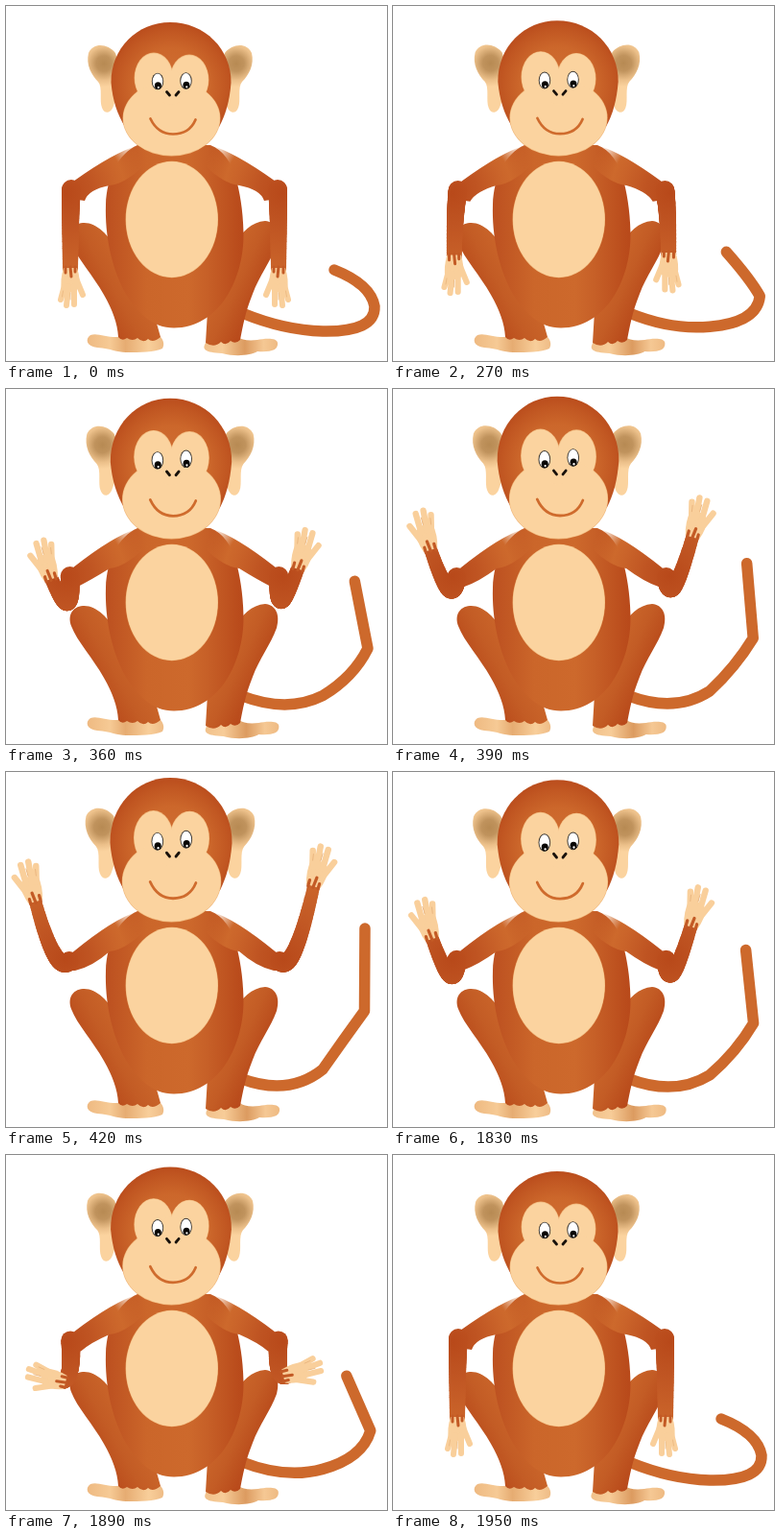
An HTML page with a canvas for the animation above (2400 ms loop, 397x370 px).

```html
<!DOCTYPE html>
<html lang="en">
<head>
<meta charset="utf-8">
<title>Waving monkey</title>
<style>
html, body { margin: 0; width: 100%; height: 100%; overflow: hidden; background: #fff; }
canvas { display: block; }
</style>
</head>
<body>
<canvas id="stage" width="397" height="370"></canvas>
<script>
const ctx = document.getElementById('stage').getContext('2d');
const LOOP = 2400, STEP = 30, RAISE_AT = 270, LOWER_AT = 1830;
const FUR = '#cd692c', DARK = '#b8491a', SKIN = '#fbd39f', PALM = '#f9cf9b';

const mix = (a, b, k) => a + (b - a) * k;
const clamp = v => Math.min(1, Math.max(0, v));
const smooth = (from, to, v) => {
  const k = clamp((v - from) / (to - from));
  return k * k * (3 - 2 * k);
};
const quad = (a, b, c, k) => mix(mix(a, b, k), mix(b, c, k), k);

function gradient(g, ...stops) {
  stops.forEach(([at, color]) => g.addColorStop(at, color));
  return g;
}
const radial = (x, y, r, ...stops) => gradient(ctx.createRadialGradient(x, y, 0, x, y, r), ...stops);
const linear = (x0, y0, x1, y1, ...stops) => gradient(ctx.createLinearGradient(x0, y0, x1, y1), ...stops);

function fill(path, style) {
  ctx.fillStyle = style;
  ctx.fill(new Path2D(path));
}

function stroke(path, style, width) {
  ctx.strokeStyle = style;
  ctx.lineWidth = width;
  ctx.stroke(new Path2D(path));
}

function oval(x, y, rx, ry, style) {
  ctx.beginPath();
  ctx.ellipse(x, y, rx, ry, 0, 0, 7);
  ctx.fillStyle = style;
  ctx.fill();
}

function mirrored(axis, draw) {
  ctx.save();
  ctx.translate(2 * axis, 0);
  ctx.scale(-1, 1);
  draw();
  ctx.restore();
}

function scaledAbout(x, y, sx, sy, draw) {
  ctx.save();
  ctx.translate(x, y);
  ctx.scale(sx, sy);
  ctx.translate(-x, -y);
  draw();
  ctx.restore();
}

// 0 = arms hanging, 1 = arms raised
function raisedAt(t) {
  const steps = from => Math.floor((t - from) / STEP) + 1;
  if (t < RAISE_AT) return 0;
  return t < LOWER_AT ? clamp(steps(RAISE_AT) / 6) : clamp(1 - steps(LOWER_AT) / 5);
}

function tail(p) {
  const kneeX = mix(384, 373.5, p), kneeY = mix(313, 249, p);
  const tipX = mix(342, 374, p), tipY = mix(275, 163, p);
  const straight = clamp(3 * p);
  const bendX = mix(380, (kneeX + tipX) / 2, straight);
  const bendY = mix(290, (kneeY + tipY) / 2, straight);
  stroke(`M246 320Q${mix(290, 295, p)} 338 330 ${mix(339, 310, p)}` +
    `Q${mix(385, 351, p)} ${mix(340, 280, p)} ${kneeX} ${kneeY}` +
    `Q${bendX} ${bendY} ${tipX} ${tipY}`, FUR, 11.5);
}

function legs(p) {
  fill('M118 345C105 346 95 340 88 343C82 347 84 355 95 356C110 357 115 361 125 361C140 361 155 361 163 357C166 352 163 346 160 344Z',
    linear(84, 0, 165, 0, [0, '#eeb981'], [.3, '#f6ca95'], [.5, '#e6ac72'], [.8, '#f8ce9a'], [1, '#eebb85']));
  fill('M118 256C106 238 94 225 80 226C69 227 64 236 68 247C74 263 91 281 102 301C111 317 116 330 117 345Q121 350 126 346Q132 350 137 346Q143 352 148 347Q153 352 161 345L154 320Z',
    linear(75, 285, 130, 255, [0, DARK], [.45, '#c35c25'], [1, FUR]));
  ctx.save();
  ctx.translate(2 * p, 0);
  fill('M208 351C204 358 207 361 225 362C240 366 255 364 262 360C275 361 284 359 283 351C282 345 268 347 262 348C252 349 245 348 242 345Z',
    linear(206, 0, 284, 0, [0, '#f1c18b'], [.25, '#f7cc98'], [.55, '#dc9b60'], [.8, '#f5c894'], [1, '#eeb981']));
  ctx.restore();
  fill('M235 252C246 235 256 225 270 224C281 225 286 235 282 249C276 266 264 281 257 300C249 320 247 333 244 348Q239 353 234 349Q229 355 224 350Q217 357 208 351L210 318Z',
    linear(272, 285, 222, 262, [0, DARK], [.45, '#c35c25'], [1, FUR]));
}

function body() {
  fill('M137 145C117 154 105 178 104 207C102 272 132 335.5 175 335.5C222 335.5 248 285 247.5 237C247 211 243 192 240 181C236 164 226 150 213 145Z',
    linear(104, 0, 247, 0, [0, '#bc5020'], [.3, '#cb662a'], [.6, FUR], [.75, '#c65f27'], [1, DARK]));
}

function hand(x, y, angle, size) {
  ctx.save();
  ctx.translate(x, y);
  ctx.rotate(angle);
  ctx.scale(size, size);
  fill('M-7 -6L7 -6Q11 6 9 15Q2 22 -9 18Q-11 6 -7 -6Z', PALM);
  stroke('M-6 12L-10 27M-2 13L-4 33M4 13L4 32M6 5L13 22', PALM, 6);
  stroke('M-7.5 18L-8.5 24M0 20L0 27', '#e9b57e', .8);
  stroke('M-5 -7L-5 -1M0 -7L1 3M5 -7L5 -2', '#c35a25', 3);
  ctx.restore();
}

function arm(p, lift) {
  const swing = p ** 1.35;
  const turn = smooth(.27, .49, p);
  const bend = Math.sin(Math.PI * p) * turn;
  const elbowX = mix(68, 66, p), elbowY = mix(191, 197, p);
  const bendX = mix(67, 51, p) + 16 * bend, bendY = 213 + 45 * bend;
  const wristX = mix(67, 29, swing), wristY = mix(279, 129, swing) - lift;

  fill(`M137 145.5Q112 153 ${elbowX + 4} ${elbowY - 9.5}L${elbowX + 1} ${elbowY + 10}` +
    `L${mix(82, 72, p)} ${mix(203, 207, p)}Q${mix(86, 90, p)} ${mix(191, 203, p)} 108 187Q125 185 145 165Z`,
    radial(62, 193, 86, [0, DARK], [.3, '#bf5422'], [.6, '#ca642a'], [.72, FUR], [1, 'rgba(205,105,44,0)']));

  const shade = radial(62, 195, 80, [0, DARK], [.4, '#bf5422'], [1, '#ca642a']);
  for (let k = 0; k <= 1; k += 1 / 64) {
    const r = mix(10, mix(8, 6.5, p), k);
    oval(quad(elbowX, bendX, wristX, k), quad(elbowY, bendY, wristY, k), r, r, shade);
  }
  hand(wristX, wristY, turn * 2.86, 1 + .08 * p);
}

function ear() {
  fill('M114 49C106 39 91 38 86 49C83 61 89 72 96 79C101 85 97 99 100 106C103 114 110 111 112 104L122 76Z',
    radial(102, 60, 27, [0, '#b78a53'], [.3, '#c0935d'], [.65, '#ecc08a'], [.9, SKIN]));
}

function eye(x, y) {
  oval(x, y, 6.2, 8.8, '#33302c');
  oval(x, y, 5.3, 7.9, '#fff');
  oval(x + .4, y + 4.5, 3.5, 3.7, '#080604');
  oval(x + .8, y + 6.3, 1.1, 1.1, '#fff');
}

function head(tilt) {
  fill('M109.5 80C109 44 137 17 171 17C207 17 235 45 234.5 80C233 99 229 113 222 126L124 126C116 113 111 98 109.5 80Z',
    radial(172, 84, 72, [0, '#d17035'], [.55, '#cc672b'], [.8, '#c15722'], [1, '#b7481a']));
  const parts = [[154, 75, 20, 26], [191, 77 - tilt, 20, 26], [172.5, 117, 50.5, 39]];
  parts.forEach(([x, y, rx, ry]) => oval(x, y, rx + .4, ry + .4, '#f0b87c'));
  parts.forEach(([x, y, rx, ry]) => oval(x, y, rx - .2, ry - .2, SKIN));
  oval(172, 85, 17, 18, SKIN);
  eye(158, 78.5);
  eye(187.5, 78 - tilt);
  stroke('M167.5 89.5L170.5 93M180 89.5L177 93', '#17100a', 2.8);
  stroke('M150.5 117.5C156 129 165 133.5 174 133.5C185 133.5 193 129 197.5 118.5', '#cf6b2d', 2.7);
}

function draw(t) {
  const p = raisedAt(t);
  ctx.fillStyle = '#fff';
  ctx.fillRect(0, 0, 397, 370);
  tail(p);
  legs(p);
  body();
  arm(p, 0);
  mirrored(175.5, () => arm(p, 16 * p));
  oval(172.8, 222.5, 48.2, 60.7, '#f0b87c');
  oval(172.8, 222.5, 47.7, 60.2, SKIN);
  scaledAbout(171, 111, 1 + .03 * p, 1 + .05 * p, () => {
    ear();
    mirrored(171, ear);
  });
  scaledAbout(172, 156, 1 + .016 * p, 1 + .079 * p, () => head(1.5 * p));
}

ctx.lineCap = 'round';
ctx.lineJoin = 'round';
const start = performance.now();
function tick() {
  draw((performance.now() - start) % LOOP);
  requestAnimationFrame(tick);
}
tick();
</script>
</body>
</html>
```
